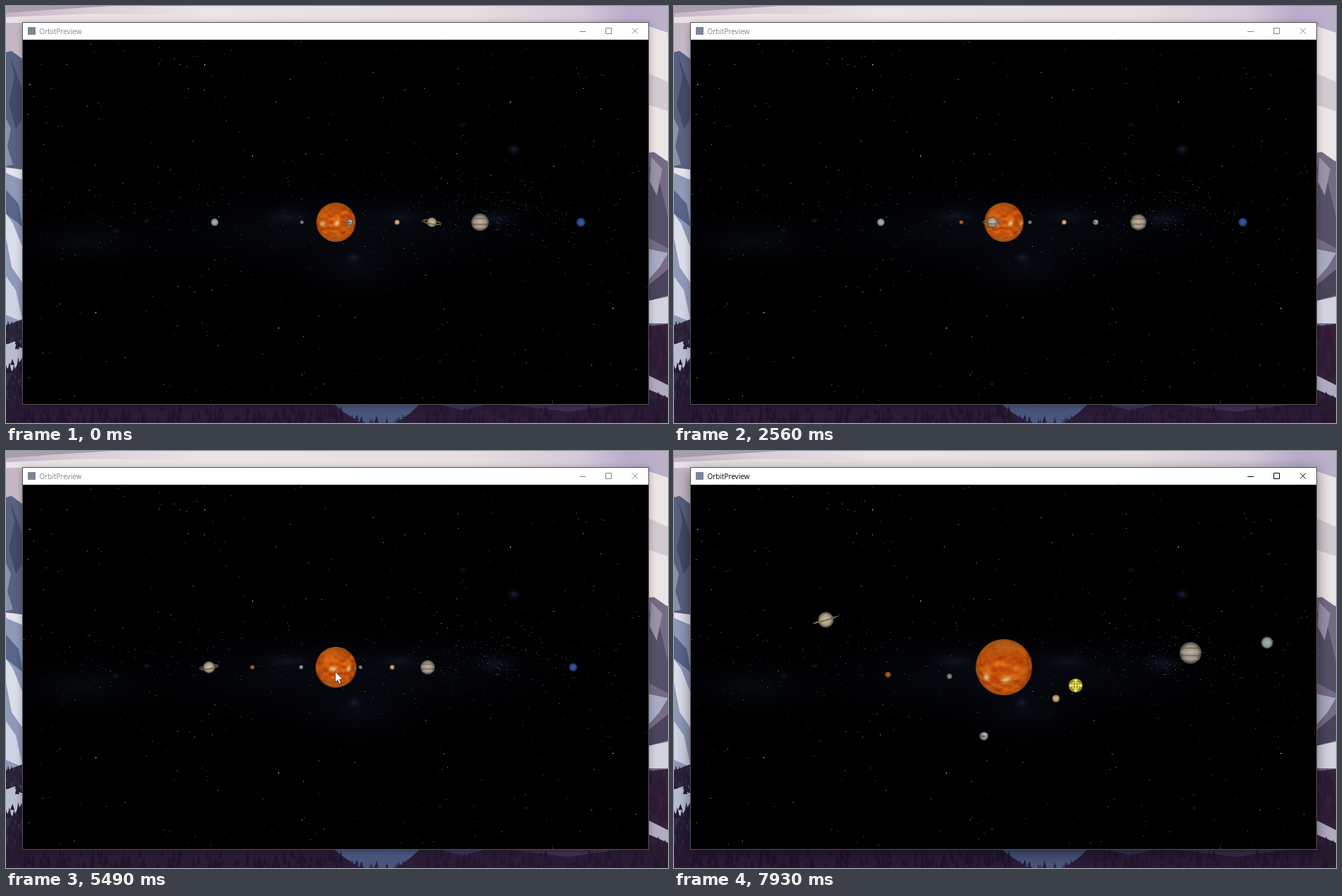
Write an HTML page with a canvas that moves like this. It is 942x594 px and loops after 8 s.

```html
<!DOCTYPE html>
<html lang="en">
<head>
<meta charset="utf-8">
<title>OrbitPreview</title>
<style>
html, body { margin: 0; width: 100%; height: 100%; overflow: hidden; background: #000; }
canvas { display: block; }
</style>
</head>
<body>
<canvas id="stage" width="942" height="594"></canvas>
<script>
const W = 942, H = 594, LOOP = 8000;
const SUN = { x: 469.5, y: 308 };
const ctx = document.getElementById('stage').getContext('2d');

const clamp = (v, lo = 0, hi = 1) => Math.min(hi, Math.max(lo, v));
const lerp = (a, b, k) => a + (b - a) * k;

function seeded(seed) {
  return () => (seed = (seed * 16807) % 2147483647) / 2147483647;
}

// Smooth cubic interpolation through values at uneven times.
function curve(times, values, t) {
  const last = times.length - 1;
  if (t <= times[0]) return values[0];
  if (t >= times[last]) return values[last];
  let i = 0;
  while (t > times[i + 1]) i++;
  const slope = k => {
    const a = Math.max(0, k - 1), b = Math.min(last, k + 1);
    return (values[b] - values[a]) / (times[b] - times[a]);
  };
  const span = times[i + 1] - times[i], u = (t - times[i]) / span, v = 1 - u;
  return (1 + 2 * u) * v * v * values[i] + u * v * v * span * slope(i) +
    u * u * (3 - 2 * u) * values[i + 1] - u * u * v * span * slope(i + 1);
}

function layer(w, h) {
  const c = document.createElement('canvas');
  c.width = w; c.height = h;
  return c.getContext('2d');
}

function poly(g, color, ...p) {
  g.fillStyle = color;
  g.beginPath();
  for (let i = 0; i < p.length; i += 2) g.lineTo(p[i], p[i + 1]);
  g.closePath();
  g.fill();
}

function glow(g, x, y, rx, ry, color) {
  g.save();
  g.translate(x, y);
  g.scale(rx, ry);
  const grad = g.createRadialGradient(0, 0, 0, 0, 0, 1);
  grad.addColorStop(0, color);
  grad.addColorStop(1, 'rgba(0,0,0,0)');
  g.fillStyle = grad;
  g.fillRect(-1, -1, 2, 2);
  g.restore();
}

// ---------- desktop wallpaper ----------
function drawWallpaper(g) {
  const rnd = seeded(77);
  const sky = g.createLinearGradient(0, 0, W, 0);
  [[0, '#c3b6c3'], [.12, '#d8ced5'], [.3, '#ebe5e6'], [.7, '#e6dedf'], [.87, '#d4c9d8'],
   [.94, '#b8accb'], [1, '#bcb0ca']].forEach(s => sky.addColorStop(...s));
  g.fillStyle = sky;
  g.fillRect(0, 0, W, H);
  poly(g, '#a99eac', 0, 0, 150, 0, 70, 5, 0, 10);
  poly(g, '#e9e2e5', 0, 16, 120, 11, 260, 13, 260, 24, 0, 24);
  poly(g, '#ece5e5', 912, 28, 942, 38, 942, 220, 912, 220);
  poly(g, '#d3cad1', 912, 95, 942, 108, 942, 150, 912, 140);

  // left slope
  poly(g, '#58617f', 0, 66, 8, 64, 24, 76, 24, 300, 0, 300);
  poly(g, '#424a67', 6, 72, 12, 100, 4, 140, 14, 175, 24, 160, 24, 120);
  poly(g, '#8791ac', 0, 160, 7, 175, 2, 200, 10, 226, 0, 228);
  poly(g, '#e3e3ed', 0, 230, 24, 233, 24, 250, 0, 238);
  poly(g, '#8f9ab9', 0, 238, 24, 248, 24, 455, 0, 460);
  poly(g, '#59658a', 0, 262, 18, 282, 24, 315, 0, 296);
  poly(g, '#dadeea', 0, 296, 10, 310, 24, 345, 24, 395, 8, 372, 0, 330);
  poly(g, '#cfd5e4', 0, 385, 14, 405, 24, 450, 0, 440);
  poly(g, '#322b43', 0, 455, 24, 446, 24, 594, 0, 594);
  poly(g, '#b9bdd0', 0, 482, 24, 474, 24, 500, 10, 520, 0, 515);

  // right slope
  poly(g, '#756b85', 914, 209, 922, 208, 942, 222, 942, 460, 914, 460);
  poly(g, '#575069', 914, 225, 930, 250, 942, 300, 942, 345, 914, 330);
  poly(g, '#9a92a8', 918, 215, 934, 232, 926, 270, 916, 250);
  poly(g, '#a7abc4', 914, 346, 942, 352, 930, 372, 914, 390);
  poly(g, '#4b435c', 914, 398, 942, 375, 942, 412, 914, 420);
  poly(g, '#d3d3e0', 914, 420, 942, 414, 942, 452, 914, 452);
  poly(g, '#35213a', 914, 456, 942, 453, 942, 594, 914, 594);
  poly(g, '#b3abc2', 914, 526, 942, 540, 942, 558, 914, 546);

  // valley and trees
  poly(g, '#2a1c35', 0, 560, W, 560, W, H, 0, H);
  poly(g, '#48557d', 465, 566, 590, 566, 575, 580, 555, 594, 505, 594, 480, 578);
  poly(g, '#3b355a', 610, 566, 690, 566, 650, 576);
  poly(g, '#40304f', 700, 566, 890, 566, 800, 578);
  const trees = (x0, x1, top, bottom, count, color) => {
    for (let i = 0; i < count; i++) {
      const x = lerp(x0, x1, rnd()), y = lerp(top, bottom, rnd()), h = 8 + rnd() * 14;
      poly(g, color, x, y, x + 3, y + h, x - 3, y + h);
    }
  };
  trees(0, 24, 448, 480, 20, '#2a2138');
  trees(0, 24, 500, 580, 45, '#251a32');
  trees(914, 942, 452, 512, 45, '#2f1c34');
  trees(914, 942, 548, 585, 22, '#291a31');
  trees(20, 480, 566, 590, 130, '#20142b');
  trees(480, 600, 580, 592, 24, '#291f3e');
  trees(590, 930, 567, 590, 90, '#23162d');
}

// ---------- night sky ----------
const BRIGHT = [282,83, 404,104, 522,94, 259,117, 282,119, 567,119, 717,136, 821,117, 846,146,
  537,130, 384,136, 266,192, 350,213, 426,210, 619,245, 641,210, 779,228, 118,262, 33,111,
  31,154, 120,54, 597,383, 623,431, 496,443, 387,458, 423,470, 421,525, 452,538, 244,399,
  76,424, 127,436, 52,494, 169,500, 97,555, 268,407, 293,404, 863,430, 833,511, 896,517];

function drawSpace(g) {
  const rnd = seeded(2024);
  g.save();
  g.beginPath();
  g.rect(24, 48, 890, 519);
  g.clip();
  g.fillStyle = '#000001';
  g.fillRect(24, 48, 890, 519);
  glow(g, 480, 320, 430, 90, 'rgba(10,15,27,.75)');
  glow(g, 110, 335, 160, 55, 'rgba(10,15,25,.6)');
  glow(g, 500, 370, 130, 70, 'rgba(9,13,24,.7)');
  glow(g, 400, 300, 55, 20, 'rgba(26,32,52,.55)');
  glow(g, 560, 300, 60, 20, 'rgba(24,31,52,.5)');
  glow(g, 695, 303, 50, 22, 'rgba(24,34,62,.5)');
  glow(g, 723, 204, 13, 11, 'rgba(38,48,82,.7)');
  glow(g, 650, 169, 9, 6, 'rgba(30,36,58,.6)');
  glow(g, 495, 358, 18, 13, 'rgba(30,42,72,.6)');
  glow(g, 156, 320, 9, 6, 'rgba(32,38,50,.6)');
  glow(g, 200, 306, 7, 5, 'rgba(42,46,58,.7)');
  const star = (x, y, a, s = 1) => {
    g.fillStyle = `rgba(190,203,232,${a})`;
    g.fillRect(x | 0, y | 0, s, s);
  };
  for (let i = 0; i < 520; i++) star(24 + rnd() * 890, 48 + rnd() * 519, .12 + rnd() ** 3 * .65);
  for (let i = 0; i < 520; i++) {
    const x = 24 + rnd() * 890;
    star(x, 300 + (rnd() + rnd() + rnd() - 1.5) * 85, .08 + rnd() ** 3 * .45);
  }
  for (let i = 0; i < 150; i++) {
    star(700 + (rnd() + rnd() - 1) * 130, 285 + (rnd() + rnd() - 1) * 60, .1 + rnd() ** 2 * .45);
  }
  for (let i = 0; i < BRIGHT.length; i += 2) star(BRIGHT[i], BRIGHT[i + 1], .9, i % 12 ? 1 : 1.5);
  g.restore();
}

const wallpaper = layer(W, H), space = layer(W, H);
drawWallpaper(wallpaper);
drawSpace(space);

// ---------- window frame ----------
function drawWindow(focus) {
  ctx.drawImage(wallpaper.canvas, 0, 0);
  ctx.save();
  ctx.shadowColor = `rgba(0,0,0,${lerp(.3, .5, focus)})`;
  ctx.shadowBlur = lerp(10, 18, focus);
  ctx.shadowOffsetY = lerp(2, 5, focus);
  ctx.fillStyle = '#55525a';
  ctx.fillRect(23, 23, 892, 545);
  ctx.restore();
  ctx.fillStyle = '#fff';
  ctx.fillRect(24, 24, 890, 24.5);
  ctx.drawImage(space.canvas, 0, 0);
  ctx.fillStyle = '#7d8599';
  ctx.fillRect(31, 30, 11, 11);

  const shade = lerp(132, 0, focus) | 0;
  ctx.fillStyle = ctx.strokeStyle = `rgb(${shade},${shade},${shade})`;
  ctx.font = '10px "Open Sans", "Noto Sans", sans-serif';
  ctx.textBaseline = 'alphabetic';
  ctx.fillText('OrbitPreview', 47.5, 39.5);
  ctx.lineWidth = 1;
  ctx.beginPath();
  ctx.moveTo(816, 36.5); ctx.lineTo(825, 36.5);
  ctx.rect(853.5, 31.5, 8, 8);
  ctx.moveTo(891, 31.5); ctx.lineTo(899, 39.5);
  ctx.moveTo(899, 31.5); ctx.lineTo(891, 39.5);
  ctx.stroke();
}

// ---------- sun ----------
const hash = (x, y, z) => {
  const s = Math.sin(x * 127.1 + y * 311.7 + z * 74.7) * 43758.5453;
  return s - Math.floor(s);
};
function noise(x, y, z) {
  const X = Math.floor(x), Y = Math.floor(y), Z = Math.floor(z);
  const ease = k => k * k * (3 - 2 * k);
  const u = ease(x - X), v = ease(y - Y), w = ease(z - Z);
  const row = (j, k) => lerp(hash(X, Y + j, Z + k), hash(X + 1, Y + j, Z + k), u);
  return lerp(lerp(row(0, 0), row(1, 0), v), lerp(row(0, 1), row(1, 1), v), w);
}

const SUN_SIZE = 84;
const sunLayer = layer(SUN_SIZE, SUN_SIZE);
const SPOTS = [[-.78, .2], [.05, .13], [.8, .17]]; // longitude, half width

function drawSun(r, spin, tilt, alpha) {
  const img = sunLayer.createImageData(SUN_SIZE, SUN_SIZE);
  const st = Math.sin(tilt), ct = Math.cos(tilt), half = SUN_SIZE / 2;
  for (let j = 0; j < SUN_SIZE; j++) for (let i = 0; i < SUN_SIZE; i++) {
    const x = (i + .5 - half) / r, y = (j + .5 - half) / r, d = Math.hypot(x, y);
    if (d > 1 + .5 / r) continue;
    const z = Math.sqrt(Math.max(0, 1 - d * d));
    const py = y * ct - z * st, pz = y * st + z * ct;
    const lon = Math.atan2(x, pz) - spin, ring = Math.hypot(x, pz);
    const px = Math.sin(lon) * ring + 9, qz = Math.cos(lon) * ring + 9;
    const n = clamp(.65 * noise(px * 3.2, py * 6 + 20, qz * 3.2) +
      .45 * noise(px * 8, py * 13 + 40, qz * 8) - .05);
    let spot = 0;
    for (const [at, width] of SPOTS) {
      const dl = Math.atan2(Math.sin(lon - at), Math.cos(lon - at)) / width;
      const dy = (py - .07 + dl * .04) / .12;
      spot += .85 * Math.exp(-dl * dl - dy * dy) * (.6 + n * .8);
    }
    spot = clamp(spot);
    const pole = clamp((Math.abs(py) - .62) * 2) * .65;
    const light = .58 + .42 * Math.sqrt(z);
    const tint = (lo, hi, polar, pale) =>
      lerp(lerp(lerp(lo, hi, n), polar, pole), pale, spot) * light;
    img.data.set([tint(170, 238, 185, 226), tint(48, 124, 120, 200), tint(2, 24, 34, 138),
      255 * clamp((1 - d) * r + .5)], (j * SUN_SIZE + i) * 4);
  }
  sunLayer.putImageData(img, 0, 0);
  ctx.globalAlpha = alpha;
  ctx.drawImage(sunLayer.canvas, SUN.x - half, SUN.y - half);
}

// ---------- planets ----------
const SIDE_TIMES = [0, 1540, 3480, 5490, 6390];
const ORBIT_TIMES = [6390, 7060, 7700, 7930];

// side: x on the edge-on line; x, y: path seen from above;
// size: radius at the start and end of each view
const PLANETS = {
  neptune: { color: [48, 80, 155], side: [818, 814, 806, 807, 828], size: [6.5, 6, 13, 14],
    x: [990, 912, 840, 800], y: [430, 542, 670, 700] },
  uranus: { color: [150, 166, 166], side: [297, 295.5, 293, 288, 274], size: [5.5, 5.5, 6.5, 8.5],
    x: [390, 589.5, 772, 844], y: [174, 178, 222, 273] },
  jupiter: { color: [168, 157, 140], side: [674.5, 674, 644.5, 600, 584], size: [12.5, 10.3, 12.5, 15.5],
    x: [473, 600, 702, 735], y: [205.5, 220, 257, 287.5], bands: true },
  mars: { color: [176, 86, 28], side: [478, 439, 384, 350.5, 338.5], size: [3, 3.2, 5, 4.3],
    x: [435.5, 350, 312, 304.5], y: [393.5, 371.5, 334, 318.5] },
  saturn: { color: [186, 172, 140], side: [606, 516, 397.5, 289, 237], size: [7, 8.5, 16.5, 11],
    x: [104, 90, 163, 216], y: [437, 328.5, 252, 240.5], ring: true },
  venus: { color: [200, 166, 112], side: [556.5, 556.5, 553.5, 549.5, 552], size: [3.8, 3.4, 4.6, 5.5],
    x: [571.5, 592, 562, 543.5], y: [283.5, 315.5, 349, 352.5] },
  earth: { color: [150, 152, 154], side: [489, 608, 562, 420, 359.5], size: [4.8, 3, 5.6, 6.3],
    x: [630.5, 553.5, 474, 441], y: [386, 413, 421, 406], clouds: true },
  mercury: { color: [130, 125, 117], side: [421, 473, 526, 504.5, 490], size: [2.8, 2.8, 3.8, 4],
    x: [443.5, 413.5, 397, 392], y: [346, 338, 327, 321] }
};

function drawRing(x, y, r, ring, front) {
  ctx.save();
  ctx.translate(x, y);
  ctx.rotate(ring.angle);
  for (const [scale, color, width] of [[.76, '#5d5544', .17], [.95, '#81775f', .09]]) {
    ctx.strokeStyle = color;
    ctx.lineWidth = Math.max(.8, r * width);
    ctx.beginPath();
    ctx.ellipse(0, 0, ring.rx * scale, ring.ry * scale, 0, front ? 0 : Math.PI, front ? Math.PI : Math.PI * 2);
    ctx.stroke();
  }
  ctx.restore();
}

function drawPlanet(p, x, y, r, alpha, ring) {
  const shade = k => `rgb(${p.color.map(c => Math.round(c * k))})`;
  ctx.globalAlpha = alpha;
  if (ring) drawRing(x, y, r, ring, false);
  ctx.save();
  ctx.beginPath();
  ctx.arc(x, y, r, 0, 7);
  const grad = ctx.createRadialGradient(x, y, 0, x, y, r);
  grad.addColorStop(0, shade(1.1));
  grad.addColorStop(.65, shade(.92));
  grad.addColorStop(1, shade(.42));
  ctx.fillStyle = grad;
  ctx.fill();
  ctx.clip();
  if (p.bands) {
    [[-.5, .14], [-.12, .08], [.16, .16], [.52, .1]].forEach(([at, h], i) => {
      ctx.fillStyle = i % 2 ? 'rgba(215,207,188,.35)' : 'rgba(74,56,44,.38)';
      ctx.fillRect(x - r, y + at * r, r * 2, h * r);
    });
  }
  if (p.clouds) {
    ctx.fillStyle = 'rgba(52,58,76,.6)';
    ctx.fillRect(x - r * .7, y - r * .15, r * .9, r * .4);
    ctx.fillStyle = 'rgba(225,222,210,.6)';
    ctx.fillRect(x - r * .2, y - r * .55, r * .9, r * .35);
  }
  ctx.restore();
  if (ring) drawRing(x, y, r, ring, true);
}

function drawSideView(t, alpha) {
  const draw = names => names.forEach(name => {
    const p = PLANETS[name], k = clamp(t / 5490);
    const ring = p.ring && { rx: 14.5, ry: 3.2, angle: lerp(.16, -.22, t / 6390) };
    drawPlanet(p, curve(SIDE_TIMES, p.side, t), SUN.y, lerp(p.size[0], p.size[1], k), alpha, ring);
  });
  const inner = ['earth', 'mercury'], inFront = t < 3000;
  draw(['neptune', 'uranus', 'jupiter', 'mars']);
  if (!inFront) draw(inner);
  drawSun(curve(SIDE_TIMES, [28, 28, 28, 29, 31.5], t), .000115 * t, 0, 1);
  draw(['saturn', 'venus']);
  if (inFront) draw(inner);
}

function drawOrbitView(t, alpha) {
  const at = values => curve(ORBIT_TIMES, values, t);
  const k = clamp((t - 6390) / 1540);
  drawSun(40, .735 - .00095 * Math.max(0, t - 6390), .4, alpha);
  for (const p of Object.values(PLANETS)) {
    const r = p.ring ? at([16.5, 13.5, 11.5, 11]) : lerp(p.size[2], p.size[3], k);
    const ring = p.ring && {
      rx: at([31, 25.5, 22, 20]), ry: at([17.5, 9, 3, .8]), angle: at([-.55, -.45, -.33, -.28])
    };
    drawPlanet(p, at(p.x), at(p.y), r, alpha, ring);
  }
  drawMoveHandle(at([499, 526.5, 560, 571.5]), at([338.5, 338, 337, 334]), alpha);
}

// ---------- pointers ----------
function drawMoveHandle(x, y, alpha) {
  ctx.save();
  ctx.globalAlpha = alpha;
  ctx.translate(x, y);
  ctx.fillStyle = '#989200';
  ctx.beginPath();
  ctx.arc(0, 0, 10, 0, 7);
  ctx.fill();
  ctx.strokeStyle = '#fbf6a8';
  ctx.lineWidth = 1;
  ctx.strokeRect(-4, -4, 8, 8);
  for (let i = 0; i < 4; i++) {
    ctx.fillStyle = '#fbf6a8';
    ctx.fillRect(-.6, -7, 1.2, 7);
    poly(ctx, '#fbf6a8', 0, -9.5, 3, -6, -3, -6);
    ctx.rotate(Math.PI / 2);
  }
  ctx.restore();
}

function drawCursor(t, alpha) {
  const times = [3300, 3400, 3480, 3900, 4200];
  if (t < times[0]) return;
  ctx.save();
  ctx.globalAlpha = alpha;
  ctx.translate(curve(times, [742, 716, 697, 515, 468.5], t), curve(times, [592, 518, 470.5, 340, 314], t));
  poly(ctx, '#fff', 0, 0, 0, 15.5, 3.4, 12.4, 5.8, 17.4, 8.2, 16.3, 5.9, 11.4, 10.6, 11.2);
  ctx.strokeStyle = '#111';
  ctx.lineWidth = .7;
  ctx.stroke();
  ctx.restore();
}

function render(t) {
  const fade = clamp((t - 6080) / 650);
  ctx.globalAlpha = 1;
  drawWindow(fade);
  ctx.save();
  ctx.beginPath();
  ctx.rect(24, 48, 890, 519);
  ctx.clip();
  if (fade < 1) drawSideView(t, 1 - fade);
  if (fade > 0) drawOrbitView(t, fade);
  ctx.restore();
  if (fade < 1) drawCursor(t, 1 - fade * fade);
}

function tick() {
  render(performance.now() % LOOP);
  requestAnimationFrame(tick);
}
tick();
</script>
</body>
</html>
```
